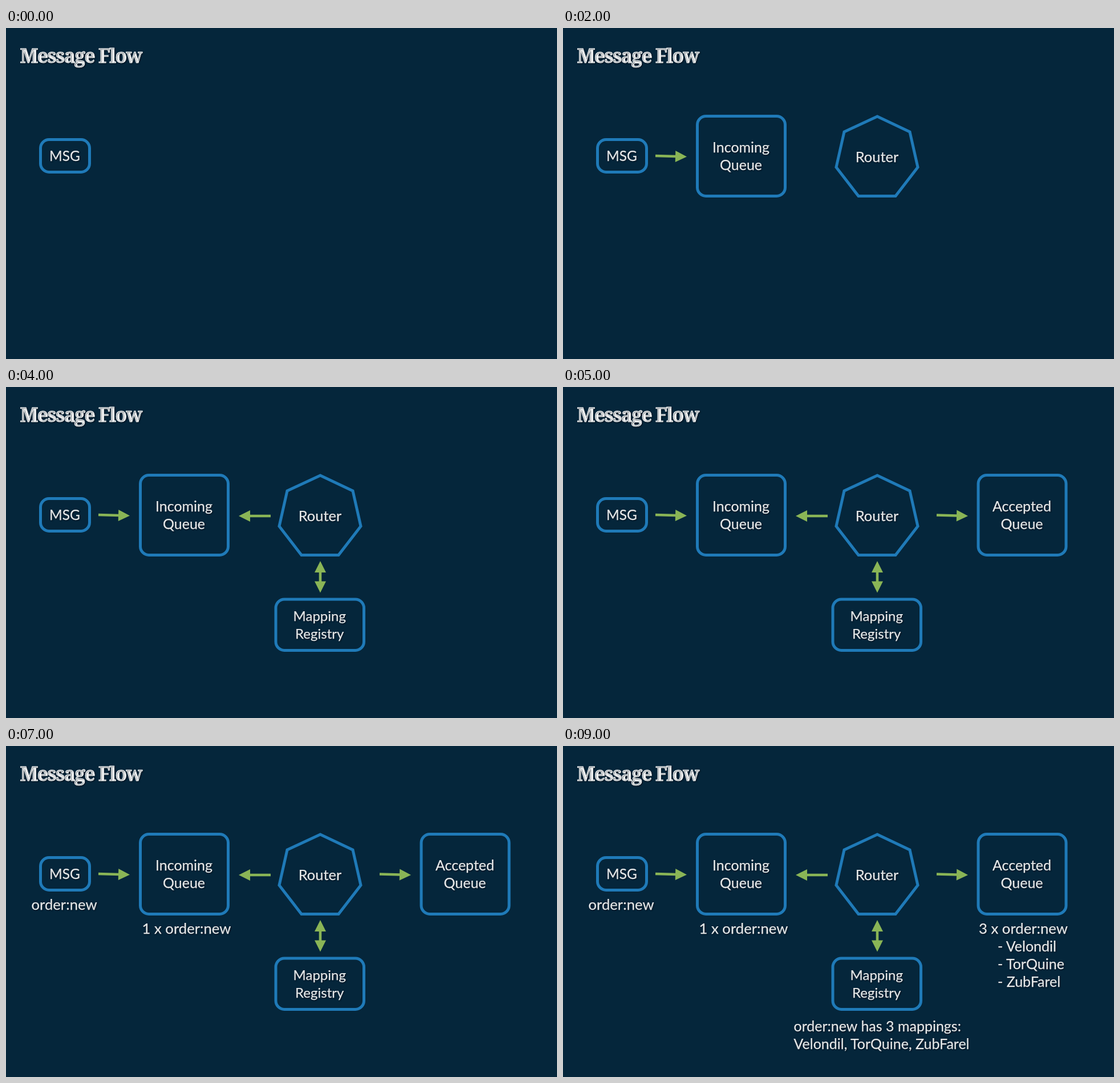
An HTML page for the animation above (10 s loop, 966 by 580 pixels).

```html
<!DOCTYPE html>
<html lang="en">
<head>
<meta charset="utf-8">
<title>Message Flow</title>
<style>
html, body { margin: 0; width: 100%; height: 100%; overflow: hidden; background: #05263b; }
svg { display: block; width: 966px; height: 580px; }
text {
  fill: #fff; stroke: #fff; stroke-width: .25;
  font-family: Lato, sans-serif; text-shadow: 1px 1px 2px #02121e;
}
.title { font: bold 33.5px "Noto Serif", serif; letter-spacing: -1.6px; stroke-width: .9; }
.shape { fill: none; stroke: #1f7ab8; stroke-width: 5; }
.line { stroke: #8ab556; stroke-width: 4.6; }
.head { fill: #8ab556; }
</style>
</head>
<body>
<svg id="stage" viewBox="0 0 966 580"></svg>
<script>
const LOOP = 10000, STEP = 1000;
const stage = document.getElementById("stage");

function add(parent, tag, attrs, content = "") {
  const el = document.createElementNS("http://www.w3.org/2000/svg", tag);
  for (const key in attrs) el.setAttribute(key, attrs[key]);
  el.textContent = content;
  parent.append(el);
  return el;
}

const label = (g, x, y, size, content, anchor = "start") =>
  add(g, "text", { x, y, "font-size": size, "text-anchor": anchor }, content);

function box(g, x, y, width, height, size, lines, baseline) {
  add(g, "rect", { class: "shape", x, y, width, height, rx: 15 });
  lines.forEach((s, i) => label(g, x + width / 2 - 0.5, baseline + i * 31, size, s, "middle"));
}

function head(g, x, y, angle) {
  add(g, "path", {
    class: "head", d: "M0 0L-20 -10V10Z",
    transform: `translate(${x} ${y}) rotate(${angle})`
  });
}

function arrow(g, x1, y1, x2, y2, both) {
  const angle = Math.atan2(y2 - y1, x2 - x1);
  const dx = 18 * Math.cos(angle), dy = 18 * Math.sin(angle);
  const start = both ? 1 : 0;
  add(g, "line", {
    class: "line", x1: x1 + dx * start, y1: y1 + dy * start, x2: x2 - dx, y2: y2 - dy
  });
  const deg = angle * 180 / Math.PI;
  head(g, x2, y2, deg);
  if (both) head(g, x1, y1, deg + 180);
}

// One entry per second; each stays until the loop ends.
const steps = [
  g => {
    add(g, "text", { class: "title", x: 24.5, y: 61 }, "Message Flow");
    box(g, 60.5, 195.5, 86, 57, 24.5, ["MSG"], 233);
  },
  g => {
    arrow(g, 162, 224, 217, 225.5);
    box(g, 235.5, 154.5, 154, 140, 25, ["Incoming", "Queue"], 218);
  },
  g => {
    add(g, "polygon", {
      class: "shape", points: "551,155 608,182 622,244 583,294.5 518,294.5 479,244 493,182"
    });
    label(g, 550.5, 235, 25.5, "Router", "middle");
  },
  g => arrow(g, 464, 226, 408, 226),
  g => {
    arrow(g, 551, 305, 551, 360.5, true);
    box(g, 473, 372, 154.5, 89.5, 24, ["Mapping", "Registry"], 410);
  },
  g => {
    arrow(g, 655, 224.5, 710, 226);
    box(g, 728, 154.5, 154, 140, 25, ["Accepted", "Queue"], 218);
  },
  g => label(g, 44.5, 287, 25.7, "order:new"),
  g => label(g, 238.5, 329, 25.7, "1 x order:new"),
  g => {
    label(g, 404.5, 500, 25, "order:new has 3 mappings:");
    label(g, 404.5, 531, 25, "Velondil, TorQuine, ZubFarel");
  },
  g => {
    label(g, 729, 329, 25.7, "3 x order:new");
    ["Velondil", "TorQuine", "ZubFarel"].forEach((s, i) =>
      label(g, 762, 360 + i * 31, 25, "- " + s));
  }
];

const groups = steps.map(draw => {
  const g = add(stage, "g", {});
  draw(g);
  return g;
});

function render(ms) {
  const current = Math.floor(ms % LOOP / STEP);
  groups.forEach((g, i) => g.setAttribute("display", i <= current ? "inline" : "none"));
}

const began = performance.now();
function tick() {
  render(performance.now() - began);
  requestAnimationFrame(tick);
}
tick();
</script>
</body>
</html>
```
